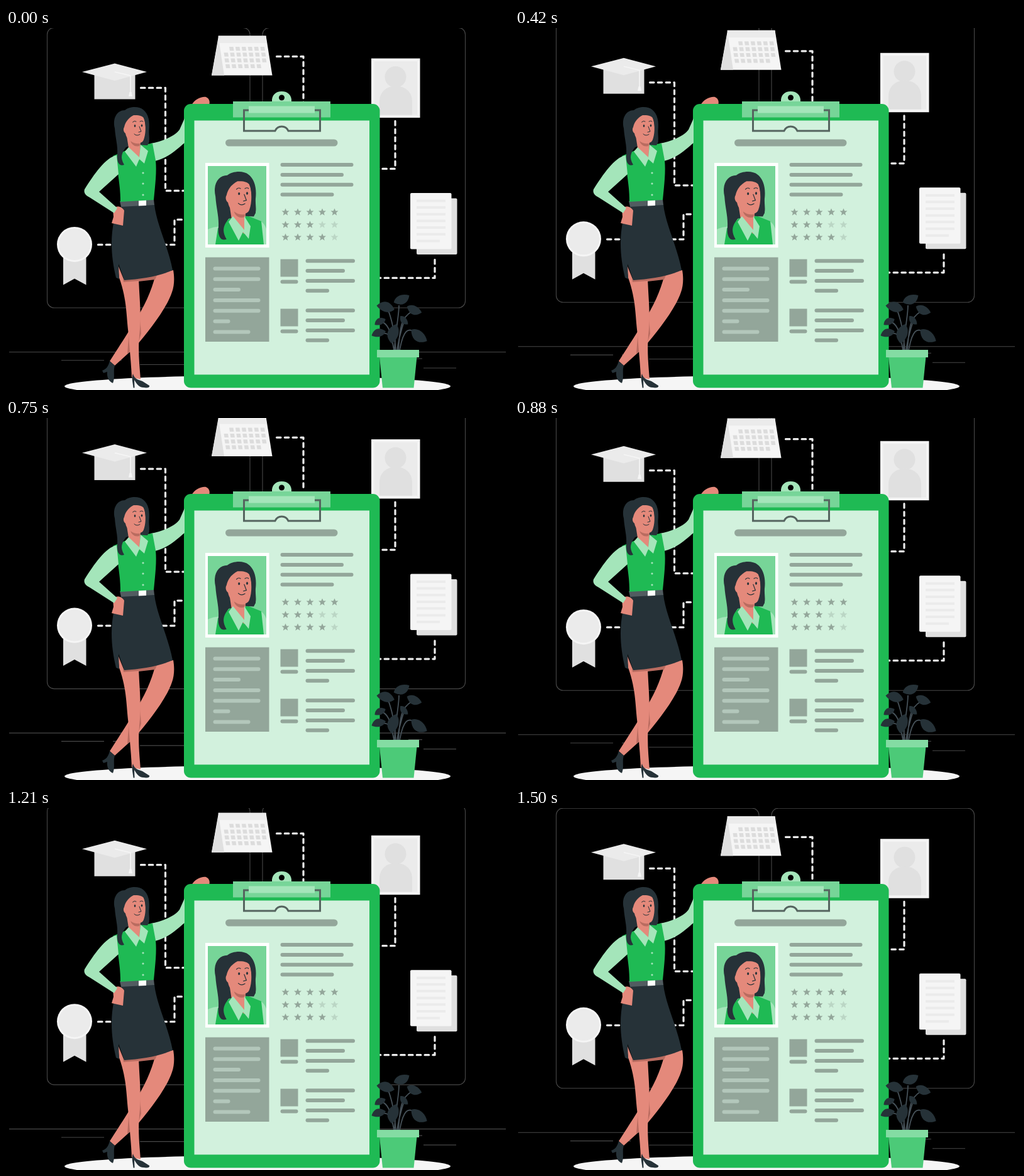
An HTML page that plays this animation: 800x577 px, repeating every 1.54 s.

```html
<!DOCTYPE html>
<html lang="en">
<head>
<meta charset="utf-8">
<title>Resume illustration</title>
<style>
  html, body { margin: 0; height: 100%; overflow: hidden; background: #000; }
  svg { display: block; width: 100%; height: 100%; }
  .room { fill: none; stroke: #484848; stroke-width: 1.1; }
  .dash { fill: none; stroke: #ebebeb; stroke-width: 3.2; stroke-dasharray: 6.5 6.3; stroke-linecap: round; stroke-linejoin: round; }
  .bar { fill: none; stroke-width: 6; stroke-linecap: round; }
  .green { fill: #1fba54; } .mint { fill: #a4e5ba; } .mid { fill: #77d598; }
  .dark { fill: #263238; } .skin { fill: #e4897b; } .shade { fill: #b96c60; }
  .sage { fill: #93a69a; } .sage-line { stroke: #93a69a; }
  .g1 { fill: #f5f5f5; } .g2 { fill: #ebebeb; } .g3 { fill: #e0e0e0; }
  .thin { fill: none; stroke: #263238; stroke-width: 1; stroke-linecap: round; }
</style>
</head>
<body>
<svg viewBox="0 0 800 577" preserveAspectRatio="none">
  <defs>
    <clipPath id="frame"><path d="M321 220H414V345H321Z"/></clipPath>
    <g id="head">
      <path class="dark" d="M173 160C169 143 177 131 189 131C196 125 211 124 218 130C227 137 229 150 227.500 163C227 173 230 180 225 187L205 186L191 190C184 199 181 206 188 218C180 221 176 214 177 202C178 187 174 176 173 160Z"/>
      <path class="skin" d="M192 172L195 191L212 211L214 180Z"/>
      <path class="shade" d="M198 180C203 184 208 185 213 184L212 188C205 190 200 186 198 180Z"/>
      <path class="skin" d="M188 158C190 148 197 142 203 139C210 139 217 139 220 145C223 157 222 170 219 178C217 184 209 185 203 182C195 180 191 174 190 168C187 166 186 161 188 158Z"/>
      <path d="M220.500 143C226 153 223 171 226 183" fill="none" stroke="#263238" stroke-width="3.500"/>
      <path class="thin" d="M201.500 150Q204 147 207 149M213 149Q216 147 218 149M204 169Q208 173 213 169.500M212 157L215 165L211 166"  stroke-width=".8"/>
      <ellipse class="dark" cx="205" cy="156" rx="1.300" ry="1.900"/>
      <ellipse class="dark" cx="216" cy="155.500" rx="1.300" ry="1.900"/>
    </g>
    <path id="star" d="M0-6L1.700-2H6L2.600 .9 3.700 5.200 0 2.800-3.700 5.200-2.600 .9-6-2H-1.700Z"/>
    <path id="leaf" class="dark" d="M-13 1C-9-9 4-11 14-5C10 6 0 12-13 1Z"/>
  </defs>

  <g id="floating">
    <g class="room">
      <rect x="65.500" y="-.5" width="322.500" height="446.500" rx="11"/>
      <rect x="408" y="-.5" width="322.500" height="446.500" rx="11"/>
      <path d="M5 516.500H795M88 529.800H156M170 529.800H184M213 536.500H290M640 527H662M664 542H716"/>
    </g>
    <g class="dash">
      <path d="M214.500 95.500H253.500V259.500H290"/>
      <path d="M430.500 45.500H473V125"/>
      <path d="M619 148.500V224.500H590"/>
      <path d="M682 369.500V398.500H590"/>
      <path d="M146.500 345.500H268V305.500H290"/>
    </g>

    <path class="g3" d="M140.500 72H205.500V113.500H140.500Z"/>
    <path class="g2" d="M121 70L173 56.500 224 70 173 84Z"/>
    <path d="M173 70L198 76V104" fill="none" stroke="#f5f5f5" stroke-width="1.600"/>
    <path class="g1" d="M196.500 102H199.500L201 109H195Z"/>

    <path class="g1" d="M338 12.500H413.500L423.500 75.500H327Z"/>
    <path class="g3" d="M338 16L347 75.500H327Z"/>
    <path class="g2" d="M337.500 12.500H413.500L414.500 24H339Z"/>
    <g id="days" fill="#dcdcdc"></g>

    <path class="g1" d="M581 48.500H658.500V143H581Z"/>
    <path class="g2" d="M585.500 53H654V138.500H585.500Z"/>
    <g class="g3">
      <circle cx="619.500" cy="78" r="17"/>
      <path d="M594 138.500V118C594 101 606 92.500 620 92.500S646 101 646 118V138.500Z"/>
    </g>

    <rect class="g3" x="653" y="271.500" width="64.500" height="89.500" rx="2"/>
    <rect class="g1" x="643" y="263" width="65.500" height="89.500" rx="2"/>
    <path d="M653 275.500H699M653 286H699M653 296.700H699M653 307.500H699M653 318H699M653 328.800H699M653 339.500H690" stroke="#ebebeb" stroke-width="4"/>

    <path class="g3" d="M91 360H127.500V409.500L109 399.500 91 409.500Z"/>
    <circle class="g1" cx="109" cy="345" r="28"/>
    <circle class="g2" cx="109" cy="345" r="25"/>
  </g>

  <ellipse class="g1" cx="400" cy="571" rx="307" ry="17"/>

  <!-- Clipboard -->
  <path class="skin" d="M295 123C300 114 310 109 318 110C323 112 325 117 323 123Z"/>
  <rect class="green" x="283" y="121" width="311.500" height="452.500" rx="11"/>
  <path d="M299.500 147.500H578V552.500H299.500Z" fill="#d2f1dd"/>
  <path class="mint" d="M423 118C422 107 429 101 438.500 101S455 107 454 118Z"/>
  <circle cx="438.500" cy="111" r="4.500"/>
  <path class="mid" d="M361 117H516V142.500H361Z"/>
  <path class="mint" d="M386 124.500H491V135.500H386Z"/>
  <path d="M386 131H378.500V164H428Q431 157 438.500 157T449 164H499.500V131H491" fill="none" stroke="#55645f" stroke-width="3"/>
  <path class="bar sage-line" d="M354.500 183H522" style="stroke-width:11"/>
  <path class="bar sage-line" d="M439.500 218H549.500M439.500 234H534M439.500 249.700H549.500M439.500 265.500H518.500"/>
  <g id="stars" class="sage"></g>
  <path class="sage" d="M317 365.500H418.500V500H317Z"/>
  <path class="bar" stroke="#b3c7bb" d="M332.500 383.500H401.500M332.500 400.200H401.500M332.500 417H370M332.500 434H401.500M332.500 450.700H401.500M332.500 467.500H353.500M332.500 484.500H385.500"/>
  <g id="job">
    <path class="sage" d="M436.500 368.500H464.500V396.500H436.500Z"/>
    <path class="bar sage-line" d="M439.500 404.500H461.500M479.500 371.200H552M479.500 387H536M479.500 403H552M479.500 418.700H511"/>
  </g>
  <use href="#job" y="79"/>

  <!-- Portrait -->
  <path fill="#fff" d="M317 215H418.500V350H317Z"/>
  <g clip-path="url(#frame)">
    <path class="mid" d="M321 220H414V345H321Z"/>
    <path class="mint" d="M321 321C328 317 338 317 345 315L352 345H321ZM398 306C408 307 412 314 414 320V345H398Z"/>
    <path class="green" d="M333 345L337 319L359 301L386 300L406 308L410 345Z"/>
    <use href="#head" transform="translate(130.800 81.600) scale(1.17)"/>
    <path class="mint" d="M361 300L354 309L370 339L377 325L386 336L389 316L379 300L379 322Z"/>
  </g>

  <!-- Woman -->
  <path class="skin" d="M234 391L266 386C268 397 268 410 264 421C256 446 227 484 205 509L173 538L165 531C178 510 193 489 202 471C220 446 232 417 237 396Z"/>
  <path class="shade" d="M210 399L240 394 237 401 211 404ZM214 444L211 500 212 497L215 487L213 462Z"/>
  <path class="shade" d="M213 455L209 505 193 519 196 480Z"/>
  <path class="dark" d="M165 531L173 538C170 547 174 557 170 566C164 564 160 557 161 548L155 550 153 546C160 544 163 538 165 531Z"/>
  <path class="skin" d="M177 375L187 400L211 397C212 431 216 458 212 489C210 515 212 535 214 560L200 557C199 532 196 509 195 488C191 459 193 435 180 398Z"/>
  <path class="shade" d="M186 400L211 398V403L187 405Z"/>
  <path class="dark" d="M202 551C204 560 212 561 217 563L228 570C229 573 225 574 219 573C211 573 208 567 204 561L204.500 573.500H202.500C202 565 199 558 202 551Z"/>
  <path class="dark" d="M183 284L236 281C239 312 258 348 265 386C243 396 215 400 188 402L179 376 180 400 175 398C168 369 165 338 172 306C178 299 180 291 183 284Z"/>
  <path d="M181 276L235 273.500 236 282 183 285Z" fill="#515c60"/>
  <path d="M211 274.500L223 274V283L211 283.500Z" fill="#fff"/>
  <path class="mint" d="M230 184C249 181 269 172 276 162L284 144V183C267 198 256 207 237 212Z"/>
  <path class="green" d="M170 204L196 193L214 186L233 184L238 211C240 230 237 252 235 274L182 277C182 250 177 230 176 213Z"/>
  <path class="skin" d="M170 288C176 282 184 284 188 291L186 315L168 311L171 301Z"/>
  <path class="mint" d="M176 203C158 206 139 235 125 257C123 263 127 267 133 270L172 295L177 287L148 261L179 233Z"/>
  <use href="#head"/>
  <path class="mint" d="M195 190L189 197L207 221L212 209L220 216L226 196L214 186L212 206Z"/>
  <g class="mint"><circle cx="218" cy="231" r="1.600"/><circle cx="218" cy="248" r="1.600"/><circle cx="218" cy="266" r="1.600"/></g>

  <!-- Plant -->
  <path d="M618 514C618 490 625 460 625 442M622 514C625 490 630 480 633 467M624 514C627 470 630 462 645 452M620 514C616 470 612 462 607 447M626 514C632 480 640 478 650 484M617 514C612 480 606 470 596 468M615 500C610 485 602 486 595 487" fill="none" stroke="#455057" stroke-width="1.800"/>
  <g id="leaves"></g>
  <path fill="#4cca78" d="M594 524H653.500L648.500 573.500H599Z"/>
  <path fill="#84dca3" d="M590 513H657V525H590Z"/>
</svg>
<script>
  const LOOP = 1540, FRAME = 1000 / 24, TRAVEL = 16, LEAD = 50;
  const byId = id => document.getElementById(id);
  const use = (id, x, y, extra = "") =>
    `<use href="#${id}" transform="translate(${x} ${y}) ${extra}"/>`;

  let days = "";
  [[355, 6], [346.5, 7], [347.5, 7], [349, 6]].forEach(([left, count], row) => {
    for (let i = 0; i < count; i++)
      days += `<path d="M${left + i * 9.9} ${30 + row * 9.3}h6.500l1 6.200h-6.500z"/>`;
  });
  byId("days").innerHTML = days;

  let stars = "";
  [5, 3, 4].forEach((score, row) => {
    for (let i = 0; i < 5; i++)
      stars += `<g opacity="${i < score ? 1 : .35}">${use("star", 444.5 + i * 19.5, 293.5 + row * 20)}</g>`;
  });
  byId("stars").innerHTML = stars;

  // x, y, rotation, scale
  byId("leaves").innerHTML = [
    [629, 434, -12, .98], [605, 444, 205, 1.05], [648, 450, 35, .92], [632, 466, 60, .65],
    [595, 467, 165, .7], [593, 485, 175, .85], [615, 486, 115, 1.15], [655, 491, 48, 1.12]
  ].map(([x, y, turn, size]) => use("leaf", x, y, `rotate(${turn}) scale(${size})`)).join("");

  const floating = byId("floating");
  function draw(now) {
    const time = Math.floor((now % LOOP + 4) / FRAME) * FRAME;
    const phase = ((time + LEAD) % LOOP) / LOOP;
    const rise = TRAVEL * (1 - Math.abs(1 - 2 * phase));
    floating.setAttribute("transform", `translate(0 ${1 - rise})`);
    requestAnimationFrame(draw);
  }
  draw(performance.now());
</script>
</body>
</html>
```
